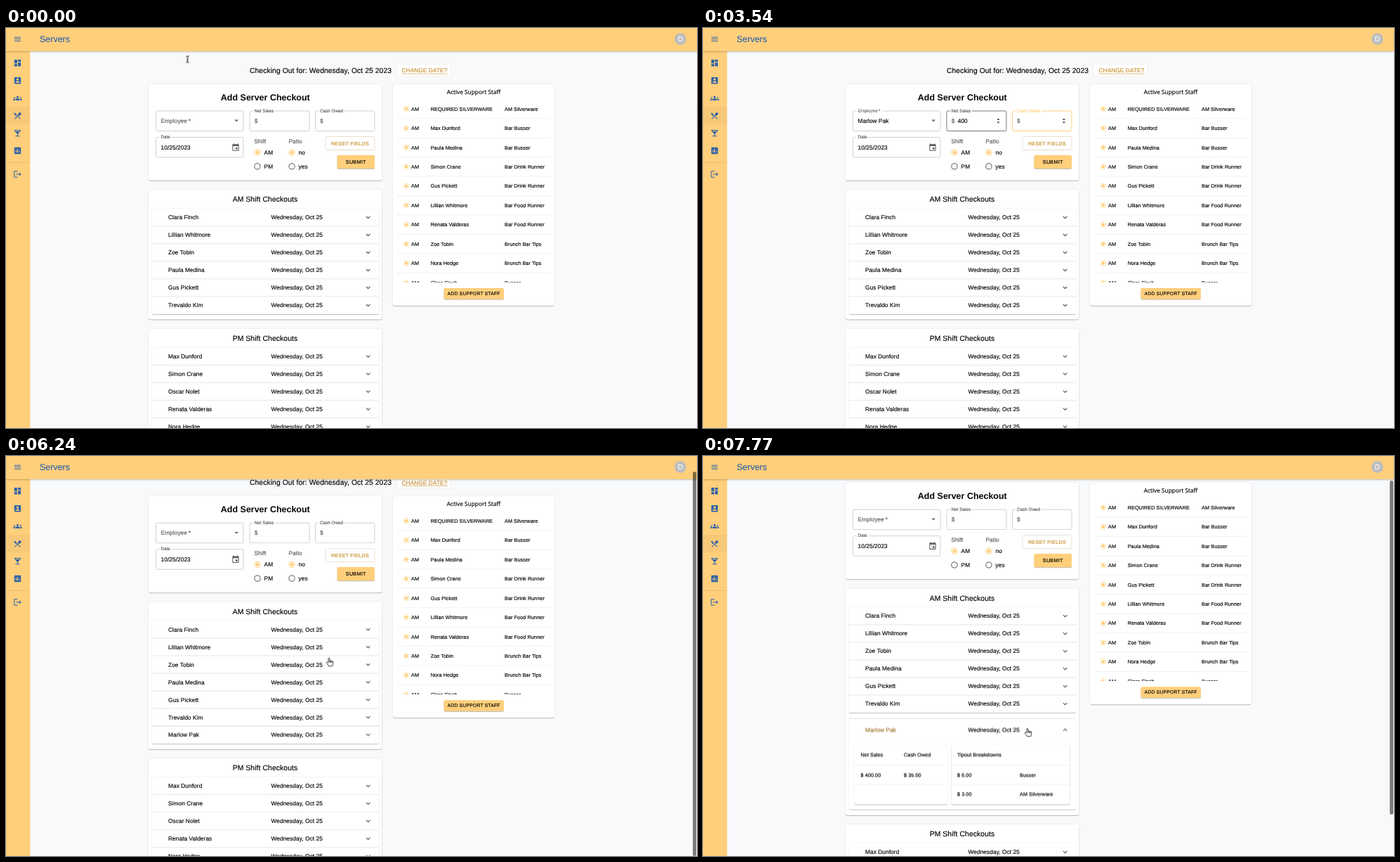
Recreate the animation shown at these times as an HTML page. Size 984 px wide and 569 px high, loop 8000 ms.

```html
<!DOCTYPE html>
<html lang="en">
<head>
<meta charset="utf-8">
<title>Servers</title>
<style>
html, body { margin: 0; width: 100%; height: 100%; overflow: hidden; background: #f8f9fb; }
svg { display: block; width: 984px; height: 569px; color: #050505; }
text { font-family: "Liberation Sans", Arial, sans-serif; fill: currentColor; stroke: currentColor; stroke-width: .16px; letter-spacing: .007em; text-rendering: geometricPrecision; white-space: pre; }
.mid { text-anchor: middle; }
.flat { letter-spacing: 0; }
.bold { font-weight: 700; letter-spacing: 0; stroke: none; }
.open { font-family: "Open Sans", "Noto Sans", sans-serif; letter-spacing: 0; }
.btn { letter-spacing: .0286em; }
.grey { color: #5c5c5c; }
.link { color: #c9902f; }
.blue { color: #2f63a8; }
.white { color: #fff; }
.grey, .blue, .white { fill: currentColor; }
.gold { fill: #ffcf7b; }
.card { fill: #fff; filter: drop-shadow(0 1px .4px rgba(0,0,0,.22)) drop-shadow(0 .3px .8px rgba(0,0,0,.09)); }
.raised { filter: drop-shadow(0 1px .5px rgba(0,0,0,.25)); }
.menu { fill: #fff; filter: drop-shadow(0 2px 3px rgba(0,0,0,.3)); }
.field { fill: none; stroke: #d0d0d0; stroke-width: 1; }
.line { fill: none; stroke: #e2e2e2; stroke-width: .8; }
.faint { fill: none; stroke: #eee; stroke-width: .8; }
.chev { fill: none; stroke: #555; stroke-width: 1.1; }
.ring { fill: none; stroke: #555; stroke-width: 1; }
</style>
</head>
<body>
<svg id="stage" viewBox="0 0 984 569" xmlns="http://www.w3.org/2000/svg"></svg>
<script>
const LOOP = 8000, RESET = 5600, OPEN = 7020;
const GOLD = '#ffcf7b', GREY = '#d0d0d0', DARK = '#777', LABEL = '#5c5c5c';
const EASE = 'cubic-bezier(.4,0,.2,1)';
let css = '', count = 0;

// Keyframes from [ms, declarations] pairs
function anim(sel, keys, ease = 'step-end') {
  const name = 'k' + count++;
  const stops = [...keys, [LOOP, keys.at(-1)[1]]];
  css += `@keyframes ${name}{${stops.map(([t, d]) => `${t / LOOP * 100}%{${d}}`).join('')}}
${sel}{animation:${name} ${LOOP}ms ${ease} infinite}`;
}
// Alternate on and off at the given times
const show = (sel, ...times) =>
  anim(sel, [[0, 'opacity:0'], ...times.map((t, i) => [t, `opacity:${1 - i % 2}`])]);
const shift = (x, y) => `transform:translate(${x}px,${y}px)`;

// Text is placed by the middle of its capitals
const text = (x, y, s, size = 8.33, cls = '', id = '') =>
  `<text x="${x}" y="${y + .358 * size}" font-size="${size}" class="${cls}" id="${id}">${s}</text>`;
const box = (x, y, w, h, cls, r = 2, id = '') =>
  `<rect x="${x}" y="${y}" width="${w}" height="${h}" rx="${r}" class="${cls}" id="${id}"/>`;
const line = (x1, x2, y, cls = 'line') => `<path d="M${x1} ${y}H${x2}" class="${cls}"/>`;
const icon = (x, y, d, cls = 'blue', s = 12.5) =>
  `<path transform="translate(${x - s / 2} ${y - s / 2}) scale(${s / 24})" d="${d}" class="${cls}"/>`;
const chevron = (y, id = '') =>
  `<g transform="translate(515.7 ${y})"><path id="${id}" class="chev" d="M-2.7 -1.3L0 1.4L2.7 -1.3"/></g>`;
const label = (x, y, s, w, id = '') =>
  box(x - 2, y - 3, w, 6, 'white', 0) + text(x, y, s, 6.25, 'grey', id);

const row = (name, y, id = '') =>
  text(231, y, name, 8.33, '', id && id + 'Name') + text(377.5, y, 'Wednesday, Oct 25') + chevron(y, id && id + 'Chev');
const rows = (names, y) => names.map((n, i) =>
  (i ? line(208, 531, y - 12.5 + 25 * i) : '') + row(n, y + 25 * i)).join('');

const day = ['Clara Finch', 'Lillian Whitmore', 'Zoe Tobin', 'Paula Medina', 'Gus Pickett', 'Trevaldo Kim'];
const night = ['Max Dunford', 'Simon Crane', 'Oscar Nolet', 'Renata Valderas', 'Nora Hedge'];
const picked = 'Marlow Pak';
const staff = [
  ['REQUIRED SILVERWARE', 'AM Silverware'], ['Max Dunford', 'Bar Busser'], ['Paula Medina', 'Bar Busser'],
  ['Simon Crane', 'Bar Drink Runner'], ['Gus Pickett', 'Bar Drink Runner'], ['Lillian Whitmore', 'Bar Food Runner'],
  ['Renata Valderas', 'Bar Food Runner'], ['Zoe Tobin', 'Brunch Bar Tips'], ['Nora Hedge', 'Brunch Bar Tips'],
  ['Clara Finch', 'Busser']
];

const sun = y => `<circle cx="570" cy="${y}" r="2.3" class="gold"/>
<circle cx="570" cy="${y}" r="3.8" fill="none" stroke="${GOLD}" stroke-width="1.3" stroke-dasharray="1.2 1.785"/>`;
const staffRow = ([name, role], i) => {
  const y = 115 + 27.45 * i;
  return sun(y) + text(577, y, 'AM', 7.29) + text(604.7, y, name, 7.29) + text(710, y, role, 7.29) +
    line(556, 776, y + 13.7, 'faint');
};

const radio = (x, y, s, on) => (on
  ? `<circle cx="${x}" cy="${y}" r="4.1" fill="none" stroke="${GOLD}"/><circle cx="${x}" cy="${y}" r="2.5" class="gold"/>`
  : `<circle cx="${x}" cy="${y}" r="4.1" class="ring"/>`) + text(x + 9.6, y, s);
const spinner = (x, id) =>
  `<path id="${id}" fill="#444" d="M${x - 2} 131l2 -2.6l2 2.6zM${x - 2} 133.2l2 2.6l2 -2.6z"/>`;

// Each entry of typed text stays until the next one
function typed(x, steps) {
  return steps.map(([t, s], i) => {
    const id = 't' + t;
    show('#' + id, t, steps[i + 1]?.[0] ?? RESET);
    return text(x, 132, s, 8.33, '', id);
  }).join('');
}
function caret(x, ...times) {
  const id = 'c' + times[0];
  show('#' + id, ...times);
  return `<rect id="${id}" x="${x}" y="127.5" width=".7" height="10" fill="#222"/>`;
}

const calendar = 'M17 12h-5v5h5v-5zM16 1v2H8V1H6v2H5c-1.1 0-2 .9-2 2v14c0 1.1.9 2 2 2h14c1.1 0 2-.9 2-2V5c0-1.1-.9-2-2-2h-1V1h-2zm3 18H5V8h14v11z';

const form = box(203, 80, 332.5, 137, 'card', 3.5) +
  text(369.3, 98.7, 'Add Server Checkout', 12.49, 'bold mid') +
  box(213.5, 118, 124.5, 28.5, 'field', 2, 'empBox') +
  `<rect id="notch" x="218.5" y="116" width="37" height="4" fill="#fff"/>
  <g id="empLabel">${text(0, 0, 'Employee\u2009*', 8.33, 'grey', 'empText')}</g>` +
  text(220.5, 132, picked, 8.33, '', 'empValue') +
  '<path d="M325.4 130.6h5.6l-2.8 2.8z" fill="#666"/>' +
  box(347, 118, 85, 28.5, 'field', 2, 'netBox') + label(353.7, 117.3, 'Net Sales', 31.5, 'netLabel') +
  text(353.7, 132, '$', 8.33, 'grey') + spinner(420.5, 'netSpin') +
  typed(362.7, [[2730, '4'], [2790, '40'], [2820, '400']]) +
  caret(363, 2080, 2580) + caret(377.5, 2740, 2990) +
  box(440.5, 118, 84.5, 28.5, 'field', 2, 'cashBox') + label(447, 117.3, 'Cash Owed', 37, 'cashLabel') +
  text(447, 132, '$', 8.33, 'grey') + spinner(514, 'cashSpin') +
  typed(456, [[3840, '3'], [4080, '35']]) +
  caret(456.3, 3010, 3540) + caret(461.2, 3841, 4080) + caret(466, 4081, 4580, 5080, 5330) +
  box(213.5, 155.5, 124.5, 28.5, 'field') + label(220.5, 154.8, 'Date', 17) +
  text(220.5, 169.7, '10/25/2023') + icon(327, 170, calendar, 'grey') +
  text(353.5, 160.8, 'Shift', 8.33, 'grey') + text(402.5, 160.8, 'Patio', 8.33, 'grey') +
  radio(358, 177, 'AM', 1) + radio(358, 196.8, 'PM') + radio(407, 177, 'no', 1) + radio(407, 196.8, 'yes') +
  '<rect x="455" y="154.5" width="70" height="19" rx="2" fill="none" stroke="#e8dfd0"/>' +
  text(490, 164, 'RESET FIELDS', 7.29, 'btn link mid') +
  box(471.5, 180.8, 53.5, 19.2, 'gold raised', 2, 'submit') + text(498.2, 190, 'SUBMIT', 7.29, 'btn mid');

const details = box(216, 444, 132, 85, 'card', 2) + box(353.7, 444, 168.8, 85, 'card', 2) +
  [[224.5, 458.8, 'Net Sales'], [286, 458.8, 'Cash Owed'], [224.5, 487.2, '$ 400.00'], [286, 487.2, '$ 35.00'],
   [362, 458.8, 'Tipout Breakdowns'], [362, 487.2, '$ 6.00'], [451, 487.2, 'Busser'],
   [362, 514.7, '$ 3.00'], [451, 514.7, 'AM Silverware']].map(a => text(...a, 7.29)).join('') +
  [473.3, 500.8].map(y => line(216, 348, y, 'faint') + line(354, 522, y, 'faint')).join('');

const dayCard = box(203, 230, 332.5, 184.5, 'card', 3.5, 'dayCard') +
  text(369, 243.6, 'AM Shift Checkouts', 10.41, 'mid') +
  box(208, 257, 323, 150, 'card', 2) + rows(day, 269.3) +
  `<g id="added"><g id="panel">${box(208, 407, 323, 25, 'card tall', 2)}${line(208, 531, 407)}
  <g id="addedRow">${row(picked, 419.2, 'new')}</g><g clip-path="url(#fold)">${details}</g></g></g>`;

const nightCard = `<g id="night">${box(203, 428, 332.5, 210, 'card', 3.5)}
  ${text(369, 441.2, 'PM Shift Checkouts', 10.41, 'mid')}${box(208, 454.5, 323, 170, 'card', 2)}${rows(night, 467)}</g>`;

const staffCard = box(551, 80, 230, 315, 'card', 3.5) +
  text(666, 91.2, 'Active Support Staff', 8.33, 'open mid') +
  `<g clip-path="url(#list)">${staff.map(staffRow).join('')}</g>` +
  box(623.5, 370, 85.5, 15.8, 'gold raised', 2) + text(666.2, 377.5, 'ADD SUPPORT STAFF', 6.77, 'btn mid');

const menu = `<g id="menu">${box(213, 147, 125, 83.3, 'menu', 2)}
  <rect id="hover" x="213" y="151.2" width="125" height="18.75" fill="#eee"/>
  ${['Max Dunford', 'Simon Crane', 'Nora Hedge', picked].map((n, i) => text(221.3, 160.6 + 18.75 * i, n)).join('')}</g>`;

const heading = text(347, 59.8, 'Checking Out for: Wednesday, Oct 25 2023', 10.35) +
  `<rect x="556.5" y="51.5" width="77" height="17" rx="2" fill="#fff" stroke="#f1f1f1"/>` +
  text(563.5, 60.3, 'CHANGE DATE?', 8.33, 'link') +
  `<path d="M563.5 65.2H629" stroke="#d3aa62" stroke-width=".8"/>`;

const people = 'M12 6a3 3 0 1 0 .01 0zM4 9a2 2 0 1 0 .01 0zM20 9a2 2 0 1 0 .01 0zM6 18v-1.6c0-5 12-5 12 0V18zM0 18v-1.6c0-2 2.5-2.7 5.1-2.3-.4.7-.6 1.5-.6 2.3V18zM24 18v-1.6c0-2-2.5-2.7-5.1-2.3.4.7.6 1.5.6 2.3V18z';
const nav = [
  [49.7, 'M3 13h8V3H3zm0 8h8v-6H3zm10 0h8V11h-8zm0-18v6h8V3z'],
  [74.7, 'M3 5v14c0 1.1.9 2 2 2h14c1.1 0 2-.9 2-2V5c0-1.1-.9-2-2-2H5c-1.1 0-2 .9-2 2zm12 4c0 1.7-1.3 3-3 3s-3-1.3-3-3 1.3-3 3-3 3 1.3 3 3zm-9 8c0-2 4-3.1 6-3.1s6 1.1 6 3.1v1H6z'],
  [99.8, people],
  [124.8, 'M8.1 13.3l2.8-2.8-7-7c-1.6 1.6-1.6 4.1 0 5.7zm6.8-1.8c1.5.7 3.7.2 5.3-1.4 1.9-1.9 2.3-4.6.8-6.1s-4.2-1.1-6.1.8c-1.6 1.6-2.1 3.7-1.4 5.3L3.7 19.9l1.4 1.4 6.9-6.9 6.9 6.9 1.4-1.4-6.9-6.9z'],
  [149.6, 'M21 5V3H3v2l8 9v5H6v2h12v-2h-5v-5zM7.4 7L5.7 5h12.6l-1.7 2z'],
  [174.5, 'M19 3H5c-1.1 0-2 .9-2 2v14c0 1.1.9 2 2 2h14c1.1 0 2-.9 2-2V5c0-1.1-.9-2-2-2zM9 17H7v-7h2zm4 0h-2V7h2zm4 0h-2v-4h2z'],
  [208, 'M17 7l-1.4 1.4 2.6 2.6H8v2h10.2l-2.6 2.6L17 17l5-5zM4 5h8V3H4c-1.1 0-2 .9-2 2v14c0 1.1.9 2 2 2h8v-2H4z']
];
const frame = `<rect width="34.3" height="569" class="gold"/><rect y="112" width="34.3" height="25.5" fill="rgba(0,0,0,.035)"/>
  <path d="M0 191.5H34" stroke="#e3bd78" stroke-width=".8"/>
  ${nav.map(([y, d]) => icon(16.5, y, d)).join('')}
  <rect width="984" height="33" class="gold" style="filter:drop-shadow(0 1px 1.2px rgba(0,0,0,.25))"/>
  <path d="M12 13.2h9M12 15.8h9M12 18.4h9" stroke="#2f63a8" stroke-width="1.05"/>
  ${text(48, 15.6, 'Servers', 12.49, 'blue flat')}
  <circle cx="960.3" cy="15.6" r="8.3" fill="#bdbdbd"/>
  ${text(960.3, 15.6, 'D', 10.41, 'mid flat white')}`;

const cursor = `<g id="cursor">
  <path id="beam" fill="none" stroke="#111" stroke-width="1" d="M-2 -4.6Q0 -4.6 0 -3.4Q0 -4.6 2 -4.6M0 -3.4V3.4M-2 4.6Q0 4.6 0 3.4Q0 4.6 2 4.6M-1 .9H1"/>
  <path id="arrow" fill="#111" stroke="#fff" stroke-width=".7" d="M-2.5 -5V4L-.5 2.2L.9 5.4L2.3 4.8L1 1.7H3.8z"/>
  <path id="hand" fill="#fff" stroke="#222" stroke-width=".85" stroke-linejoin="round" d="M-2 1V-4.6a.95 .95 0 0 1 1.9 0V-1.3a.85 .85 0 0 1 1.7 0v.4a.8 .8 0 0 1 1.6 0v.6a.75 .75 0 0 1 1.5 0V2.4c0 1.5-.9 2.1-.9 3.5H-1.6c0-1.3-1.6-2.3-2.9-4.2c-.7-1.2 .6-2 1.5-1.3zM-.1 -1.3V1.2M1.6 -.9V1.2M3.2 -.3V1.2"/></g>`;

document.getElementById('stage').innerHTML = `<defs>
  <clipPath id="list"><rect x="551" y="100" width="230" height="261.8"/></clipPath>
  <clipPath id="fold"><rect class="tall" x="206" y="407" width="327" height="25"/></clipPath></defs>
  <g id="page">${heading}${form}${dayCard}${nightCard}${staffCard}${menu}</g>${frame}
  <rect id="thumb" x="978" y="2" width="5" height="547" rx="2.5" fill="rgba(0,0,0,.5)"/>${cursor}`;

// Employee field and its menu
const ink = c => 'color:' + c, stroke = c => 'stroke:' + c;
const small = 'transform:translate(220.5px,117.3px) scale(.75)', full = shift(220.5, 131.7);
const glow = (sel, on, off) => anim(sel, [[0, ink(LABEL)], [on, ink(LABEL)], [on + 150, ink(GOLD)],
  [off, ink(GOLD)], [off + 180, ink(LABEL)]], 'linear');
anim('#empLabel', [[0, full], [560, full], [700, small], [RESET, small], [5740, full]], 'linear');
glow('#empText', 560, 2080);
anim('#empBox', [[0, stroke(GREY)], [430, stroke(DARK)], [560, stroke(GOLD)], [2080, stroke(GREY)]]);
show('#notch', 620, RESET + 60);
show('#empValue', 1530, RESET);
anim('#menu', [[0, 'opacity:0'], [560, 'opacity:0'], [700, 'opacity:1'], [1500, 'opacity:1'], [1680, 'opacity:0']], 'linear');
anim('#hover', [0, 1040, 1120, 1210].map((t, i) => [t, shift(0, 18.75 * i)]));

// Money fields
anim('#netBox', [[0, stroke(GREY)], [1830, stroke(DARK)], [2080, stroke(GOLD)], [3000, stroke(DARK)], [4660, stroke(GREY)]]);
anim('#cashBox', [[0, stroke(GREY)], [3000, stroke(GOLD)], [5330, stroke(GREY)]]);
glow('#netLabel', 2080, 2970);
glow('#cashLabel', 2970, 5330);
show('#netSpin', 1830, 4660);
show('#cashSpin', 3000, 5330);
const warm = 'fill:' + GOLD, deep = 'fill:#b29156';
anim('#submit', [[0, warm], [5080, warm], [5300, deep], [5620, deep], [5840, warm]], 'linear');

// New row, then its unfolding
const unfold = (sel, a, b, c, end = 7320) =>
  anim(sel, [[0, a], [RESET - 1, a], [RESET, b], [OPEN, b], [end, c]], EASE);
show('#added', RESET);
unfold('#dayCard', 'height:184.5px', 'height:209.6px', 'height:322.8px');
unfold('#night', shift(0, 0), shift(0, 25), shift(0, 138));
unfold('.tall', 'height:25px', 'height:25px', 'height:129.6px');
unfold('#panel', shift(0, 0), shift(0, 0), shift(0, 8.3), 7170);
unfold('#addedRow', shift(0, 0), shift(0, 0), shift(0, 4), 7170);
unfold('#newChev', 'transform:rotate(0deg)', 'transform:rotate(0deg)', 'transform:rotate(180deg)', 7170);
anim('#newName', [[0, ink('#050505')], [OPEN, ink('#a0742a')]]);

// Scrolling
anim('#page', [[0, 0], [6150, 0], [6180, 3], [6210, 12], [6240, 22.5], [6270, 29], [6300, 32], [7640, 32], [7770, 41.8]]
  .map(([t, y]) => [t, shift(0, -y)]), 'linear');
anim('#thumb', [[0, 2, 547, 0], [6090, 2, 547, 0], [6170, 3, 547, 1], [6240, 22, 547, 1], [6300, 31, 536, 1],
  [6650, 31, 536, 1], [6900, 31, 536, .14], [7000, 31, 536, 0], [7640, 31, 475, 0], [7670, 32, 475, 1], [7770, 35, 475, 1]]
  .map(([t, y, h, o]) => [t, `y:${y}px;height:${h}px;opacity:${o}`]), 'linear');

// Pointer
anim('#cursor', [[0, 258.5, 44.5], [30, 258.5, 44.5], [150, 264, 54], [480, 322, 121], [600, 334, 131], [830, 334, 131],
  [1290, 226, 222], [1530, 226, 222], [1860, 402.5, 123], [2080, 384.5, 133], [4530, 384.5, 133], [4880, 445, 158],
  [5200, 485.5, 189.5], [5450, 485.5, 189.5], [6120, 461, 293], [6450, 461, 293], [6860, 463, 394], [7770, 463, 393]]
  .map(([t, x, y]) => [t, shift(x, y)]), 'linear');
show('#beam', 0, 430, 1750, 2730, 4530, 4660);
show('#arrow', 1620, 1750, 4660, 4880);
show('#hand', 430, 1620, 4880);

const sheet = document.createElement('style');
sheet.textContent = css;
document.head.append(sheet);
</script>
</body>
</html>
```
